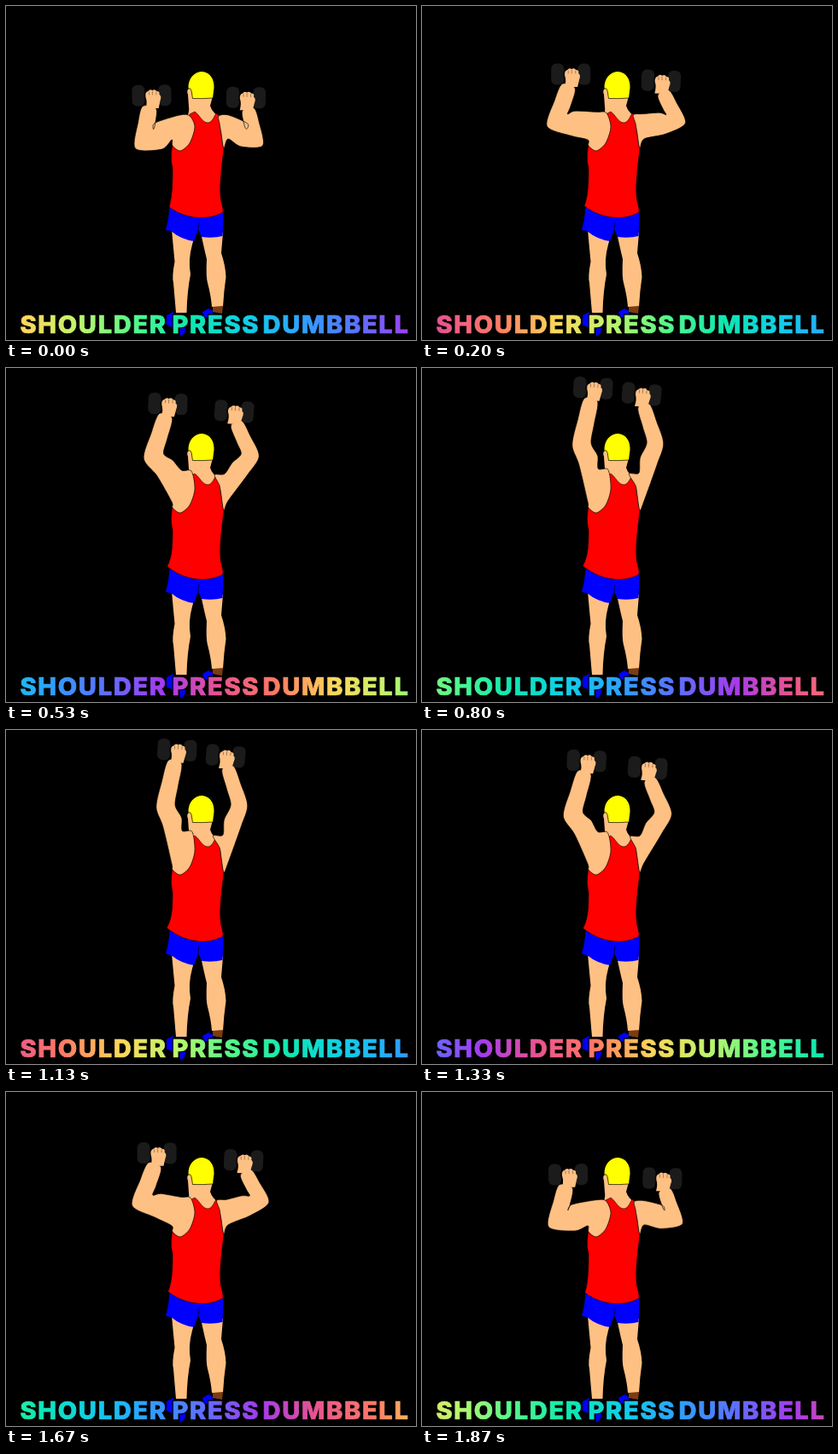
These frames come from a looping animation (480 by 392 pixels, 1.94 s). An HTML page:

```html
<!DOCTYPE html>
<html lang="en">
<head>
<meta charset="utf-8">
<title>Shoulder press dumbbell</title>
<style>
  html, body { margin: 0; width: 100%; height: 100%; overflow: hidden; background: #000; }
  svg { display: block; width: 100vw; height: 100vh; }
  .skin { fill: #ffc083; }
  .line { fill: none; stroke: #000; stroke-width: .7; stroke-linecap: round; }
  .arm { stroke: #000; stroke-width: .7; }
  text { font: 800 29px Inter, "Open Sans", sans-serif; letter-spacing: 1.7px; }
</style>
</head>
<body>
<svg viewBox="0 0 480 392">
  <defs>
    <linearGradient id="rainbow" gradientUnits="userSpaceOnUse" spreadMethod="repeat" y1="0" y2="0"></linearGradient>
    <g id="weights" fill="#1b1b1b">
      <rect x="-23" y="-12.500" width="15" height="25" rx="6"/>
      <rect x="8" y="-12.500" width="15" height="25" rx="6"/>
      <rect x="-9" y="-3" width="18" height="6" fill="#0c0c0c"/>
    </g>
    <g id="fist">
      <path class="skin" d="M-8,14 Q-6,6 -8,1 Q-9,-5 -5,-6 Q-3,-9 0,-7 Q3,-9 5,-6 Q9,-6 8,-2 Q11,0 9,5 L7,14 Z"/>
      <path class="line" d="M-4,-5 V-2 M0,-6 V-2 M4.500,-5 V-2" stroke-opacity=".5"/>
    </g>
    <g id="title">
      <text x="16.500" y="383.500">SHOULDER</text>
      <text x="194.500" y="383.500">PRESS</text>
      <text x="300.500" y="383.500">DUMBBELL</text>
    </g>
  </defs>

  <rect width="480" height="392"/>
  <path fill="#00f" d="M188,363 L196,359 V378 L188,374 Z M203,372 H211 L209,384 L204,388 Z M230,359 L237,355 L242,358 V365 H232 Z"/>
  <path class="skin" d="M194,262 Q196,285 197.500,300 Q194,318 196,325 L199,360 H211.500 Q212,335 216,315 Q213,298 218,280 L222,266 Z"/>
  <path class="skin" d="M228,266 Q232,285 235,297 Q234,318 236,325 Q240,340 241,353 H254 Q255,335 257.500,318 Q257,305 252,290 L254,266 Z"/>
  <path fill="#7a3c14" d="M242,353 L254,352 L253,361 L242,359 Z"/>
  <path fill="#00f" d="M192,232 L190,250 L187,263 L193,264 Q205,274 220,276 L225,262 L229,271 Q242,273 253.500,270 L255,238 Z"/>
  <path class="line" d="M225,262 L226,254"/>
  <path class="skin" d="M214,97 Q211,99 213,104 L214,118 Q215,124 212,130 L236,142 L250,131 Q241,124 239,117 L242,106 Z"/>
  <path id="shirt" fill="#f00" stroke="#000" stroke-width=".6"/>
  <g id="arms"></g>
  <path fill="#ff0" d="M218,108.500 C218,102 217,97 213.500,97 C213,84 221,77 230,77 C239,78 244,86 243.500,96 L242,108 Q230,109 218,108.500 Z"/>
  <path class="line" d="M213,97 Q217,95 217.500,102 L218.500,108.500 Q230,109 242,108"/>
  <use href="#title" stroke="#000" stroke-width="3"/>
  <use href="#title" fill="url(#rainbow)" stroke="url(#rainbow)" stroke-width=".7"/>
</svg>
<script>
const STEPS = 29, LOOP = 1940, PERIOD = 660;
const $ = id => document.getElementById(id);

const COLORS = '#ffd65a #c0f56b #55f78a #0fe8b0 #10cfe8 #2ea0ff #5f6eff #a53bec #e8558e #ff7864 #ffd65a'.split(' ');
$('rainbow').innerHTML = COLORS.map((c, i) => `<stop offset="${i / 10}" stop-color="${c}"/>`).join('');

// Each joint travels along a quadratic curve: start, control, end.
const ARMS = [
  { side: -1, size: 1,
    grip: [[170.5, 105], [171.5, 67.5], [202.5, 20]],
    elbow: [[161, 157], [146, 122], [189, 87]],
    shoulder: [[205, 146], [206, 140], [208, 136]],
    armhole: [[194, 157], [195, 164], [204, 170], [215, 161], [221, 142]] },
  { side: 1, size: .88,
    grip: [[281, 107.5], [284.5, 81], [255, 26.5]],
    elbow: [[292, 155], [311, 120.5], [271, 86]],
    shoulder: [[259, 146], [257, 144], [252, 141]],
    armhole: [[260, 156], [255, 167], [252, 150], [250, 138]] }
];

const add = (p, q, k = 1) => [p[0] + q[0] * k, p[1] + q[1] * k];
const mix = (p, q, k) => add(p, add(q, p, -1), k);
const unit = ([x, y]) => [x / Math.hypot(x, y), y / Math.hypot(x, y)];
const toward = (p, q) => unit(add(q, p, -1));
const bezier = ([a, b, c], k) => mix(mix(a, b, k), mix(b, c, k), k);

for (const arm of ARMS) {
  const group = document.createElementNS('http://www.w3.org/2000/svg', 'g');
  group.innerHTML = '<use href="#weights"/><path class="skin arm"/><use href="#fist"/>';
  $('arms').append(group);
  [arm.weights, arm.outline, arm.fist] = group.children;
}

// Builds the arm's silhouette around its bones.
function armOutline({ side, size, armhole }, grip, elbow, shoulder, raise) {
  const outward = (p, q) => {
    const [x, y] = toward(p, q);
    return [-side * y, side * x];
  };
  const wrist = add(grip, [side * 2.5, 14]);
  const forearm = mix(elbow, wrist, .5), upper = mix(elbow, shoulder, .4);
  const foreOut = outward(elbow, wrist), upperOut = outward(shoulder, elbow);
  const bend = unit(add(toward(wrist, elbow), toward(shoulder, elbow)));
  const wristHalf = 8 * size, foreHalf = 10 * size;
  const elbowHalf = (14 - 4 * raise) * size, upperHalf = (16 - 4 * raise) * size;
  return [
    add(wrist, foreOut, wristHalf), add(forearm, foreOut, foreHalf),
    add(elbow, bend, elbowHalf), add(upper, upperOut, upperHalf),
    ...armhole,
    add(shoulder, [-side * 10, -17]), add(shoulder, [side * 1.5, -18]),
    add(upper, upperOut, -upperHalf), add(elbow, bend, -elbowHalf * 1.2),
    add(forearm, foreOut, -foreHalf), add(wrist, foreOut, -wristHalf)
  ];
}

function smoothClosed(points) {
  const n = points.length, at = i => points[(i + n) % n];
  const curves = points.map((p, i) => {
    const next = at(i + 1);
    const out = add(p, add(next, at(i - 1), -1), 1 / 7);
    const into = add(next, add(at(i + 2), p, -1), -1 / 7);
    return `C${out} ${into} ${next}`;
  });
  return `M${points[0]}${curves.join('')}Z`;
}

function draw(time) {
  const ticks = Math.floor(time % LOOP / 10);
  const step = Math.min(STEPS - 1, Math.floor((ticks + .5) * 3 / 20));
  const raise = Math.sin(Math.PI * step / STEPS);

  for (const arm of ARMS) {
    const [grip, elbow, shoulder] = [arm.grip, arm.elbow, arm.shoulder].map(path => bezier(path, raise));
    const place = ([x, y]) => `translate(${x} ${y}) rotate(${4 * raise + arm.side})`;
    arm.weights.setAttribute('transform', place(grip));
    arm.fist.setAttribute('transform', place(add(grip, [1, 1])));
    arm.outline.setAttribute('d', smoothClosed(armOutline(arm, grip, elbow, shoulder, raise)));
  }

  $('shirt').setAttribute('d', `M215,127 L221,124 C226,127 230,137 236,137 C241,137 243,131 246,126 L250,129
    C251,142 252,154 255,168 C253,185 250,205 251,222 C251,230 255,236 254,242
    C240,251 212,252 ${191 - 3 * raise},${236 - 4 * raise} C195,221 195,205 195,190 C192,178 194,170 195,160 L212,140 Z`);

  const start = 18 + step * 2 / STEPS * PERIOD;
  $('rainbow').setAttribute('x1', start);
  $('rainbow').setAttribute('x2', start + PERIOD);
}

function loop(time) {
  draw(time);
  requestAnimationFrame(loop);
}
draw(0);
requestAnimationFrame(loop);
</script>
</body>
</html>
```
